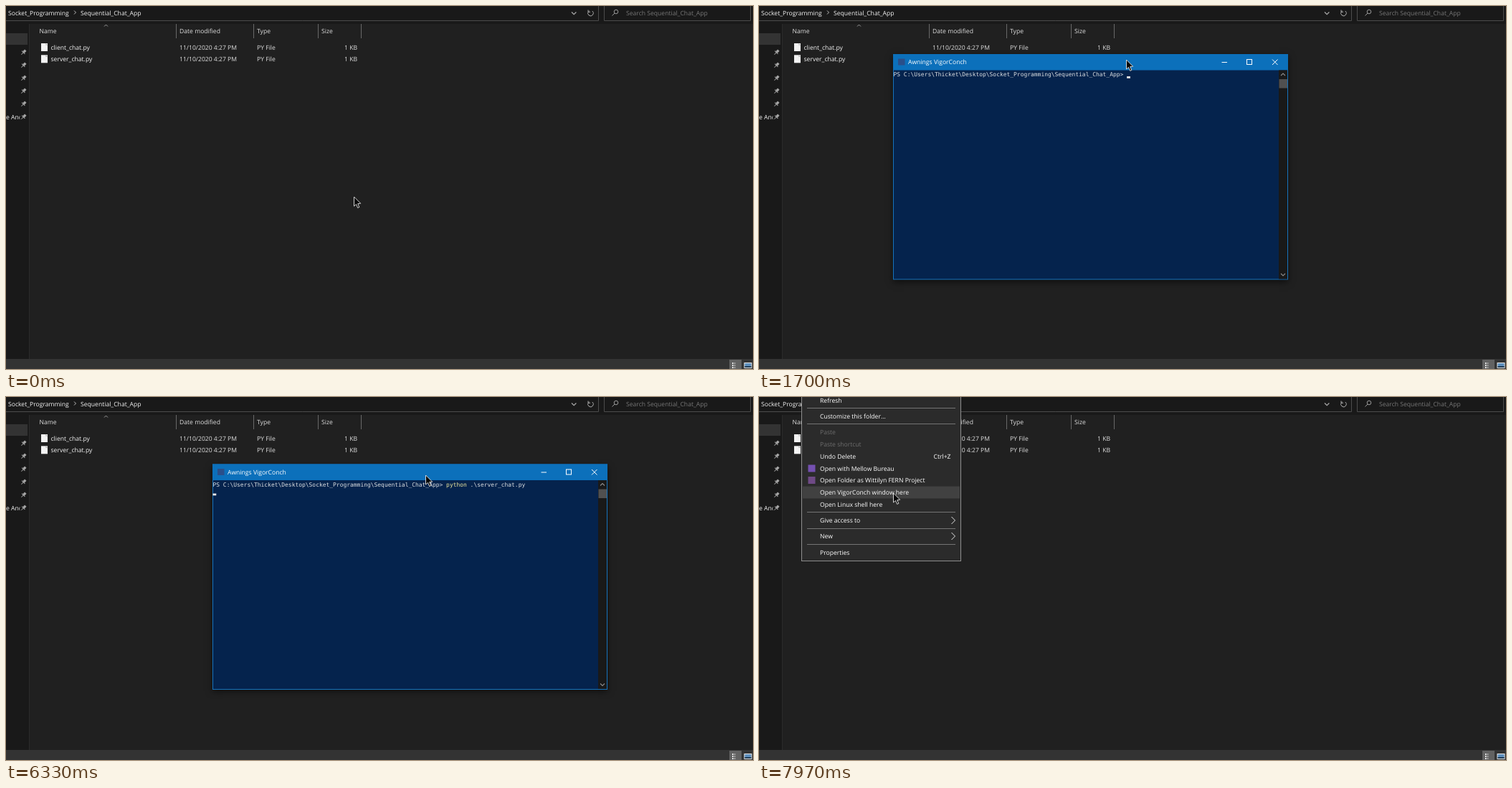
An HTML page with a canvas that plays this animation: 1042 px wide and 506 px high, repeating every 8000 ms.

```html
<!DOCTYPE html>
<html lang="en">
<head>
<meta charset="utf-8">
<title>Opening a shell and starting a chat server</title>
<style>
  html, body { margin: 0; width: 100%; height: 100%; overflow: hidden; background: #202020; }
  canvas { display: block; }
</style>
</head>
<body>
<canvas id="stage" width="1042" height="506"></canvas>
<script>
const ctx = document.getElementById('stage').getContext('2d');
const LOOP = 8000;
const UI = '8.6px "Open Sans", "Noto Sans", sans-serif';
const MONO = '7.96px "DejaVu Sans Mono", monospace';
const PROMPT = String.raw`PS C:\Users\Thicket\Desktop\Socket_Programming\Sequential_Chat_App> `;
const COMMAND = String.raw`python .\server_chat.py`;

// The shell opens, then drops behind the folder once that is clicked
const SHELL_OPENS = 1400, SHELL_HIDES = 7400;

// Key points: time, x, y
const MOUSE = [
  [300, 485, 266], [1050, 420, 172], [1250, 420, 172], [1680, 512, 75], [1740, 512, 75],
  [2150, 613, 101], [2400, 592, 126], [6170, 592, 126], [6310, 585, 109], [6400, 585, 109],
  [6900, 843, 120], [6970, 843, 120], [7300, 287, 231], [7400, 282, 229], [7530, 282, 229],
  [7930, 187, 134]
];
const WINDOW = [[1740, 187, 67], [2150, 288, 93.5], [6400, 288, 93.5], [6900, 546, 104.5]];

// Menu rows: label, centre measured from the menu's bottom edge, kind
const ROWS = [
  ['Sort by', 257, 'sub'], ['Group by', 240, 'sub'], ['Refresh', 223.5],
  ['Customize this folder...', 201.5], ['Paste', 179, 'off'], ['Paste shortcut', 162, 'off'],
  ['Undo Delete', 145.5, 'Ctrl+Z'], ['Open with Mellow Bureau', 128.5, '#7450b0'],
  ['Open Folder as Wittilyn FERN Project', 112, '#6f4a86'],
  ['Open VigorConch window here', 95], ['Open Linux shell here', 78.5],
  ['Give access to', 56, 'sub'], ['New', 34, 'sub'], ['Properties', 11.5]
];
const SEPARATORS = [213, 191, 68, 45, 23];

const clamp = v => Math.max(0, Math.min(1, v));
const ease = v => v * v * (3 - 2 * v);

function follow(path, t) {
  const i = path.findIndex(p => p[0] > t);
  if (i === 0) return path[0].slice(1);
  if (i < 0) return path[path.length - 1].slice(1);
  const [t0, x0, y0] = path[i - 1], [t1, x1, y1] = path[i];
  const k = ease((t - t0) / (t1 - t0));
  return [x0 + (x1 - x0) * k, y0 + (y1 - y0) * k];
}

function rect(x, y, w, h, color) {
  ctx.fillStyle = color;
  ctx.fillRect(x, y, w, h);
}

function text(str, x, y, color = '#f2f2f2', font = UI, align = 'left') {
  ctx.font = font;
  ctx.textAlign = align;
  ctx.textRendering = 'geometricPrecision';
  ctx.fillStyle = color;
  ctx.fillText(str, x, y);
}

function line(points, color, width = 1) {
  ctx.beginPath();
  for (let i = 0; i < points.length; i += 2) ctx.lineTo(points[i], points[i + 1]);
  ctx.strokeStyle = color;
  ctx.lineWidth = width;
  ctx.stroke();
}

function arc(x, y, r, from, to, color) {
  ctx.beginPath();
  ctx.arc(x, y, r, from, to);
  ctx.strokeStyle = color;
  ctx.lineWidth = 1;
  ctx.stroke();
}

function pin(x, y) {
  ctx.save();
  ctx.translate(x, y);
  ctx.rotate(Math.PI / 4);
  rect(-1.7, -4, 3.4, 4, '#a5a5a5');
  rect(-3, -0.3, 6, 1.2, '#a5a5a5');
  rect(-0.4, 0.5, 0.8, 4, '#a5a5a5');
  ctx.restore();
}

function drawFile(name, y) {
  rect(49, y - 6, 9, 11, '#f4f4f4');
  ctx.fillStyle = '#a8a8a8';
  ctx.beginPath();
  ctx.moveTo(55.5, y - 6);
  ctx.lineTo(58, y - 3.5);
  ctx.lineTo(55.5, y - 3.5);
  ctx.fill();
  text(name, 62.5, y + 3);
  text('11/10/2020 4:27 PM', 242, y + 3, '#dedede');
  text('PY File', 350, y + 3, '#dedede');
  text('1 KB', 490, y + 3, '#dedede', UI, 'right');
}

function drawExplorer() {
  rect(0, 0, 1042, 506, '#202020');
  rect(0, 0, 1042, 25, '#191919');
  rect(0, 25, 32, 467, '#191919');
  rect(32, 25, 1, 467, '#2b2b2b');
  rect(0, 38, 30, 16, '#333');
  rect(0, 492, 1042, 14, '#333');

  line([0, 20.5, 826.5, 20.5, 826.5, 0], '#4c4c4c');
  line([834.5, 0, 834.5, 20.5, 1038.5, 20.5, 1038.5, 0], '#4c4c4c');
  text('Socket_Programming', 3, 13);
  text('Sequential_Chat_App', 104, 13);
  line([95, 6.5, 97.5, 9, 95, 11.5], '#bbb');
  line([789, 8.5, 792.2, 11.7, 795.4, 8.5], '#aaa', 1.2);
  arc(815.5, 10, 3.8, -0.9, 4.2, '#aaa');
  line([812, 5.5, 812, 8.3, 815, 8.3], '#aaa');
  arc(851, 8, 2.8, 0, 7, '#999');
  line([849, 10, 845.5, 13.5], '#999');
  text('Search Sequential_Chat_App', 865, 13, '#777');

  [237.5, 345.5, 435.5, 495.5].forEach(x => line([x, 25, x, 45], '#686868'));
  [['Name', 46.5], ['Date modified', 242], ['Type', 350], ['Size', 440]]
    .forEach(([label, x]) => text(label, x, 38, '#dedede'));
  line([137, 28.5, 139.5, 26, 142, 28.5], '#999');
  drawFile('client_chat.py', 58);
  drawFile('server_chat.py', 74.3);

  for (let i = 0; i < 6; i++) pin(24.5, 64.5 + i * 18);
  ctx.save();
  ctx.beginPath();
  ctx.rect(0, 145, 19.5, 20);
  ctx.clip();
  text('e And', 0, 157.5);
  ctx.restore();

  rect(1009, 493, 17, 13, '#626262');
  for (let i = 0; i < 3; i++) {
    rect(1013, 497 + i * 3, 1.5, 2, '#fff');
    rect(1015.5, 497.5 + i * 3, 2, 1, '#ddd');
  }
  rect(1029.5, 497, 11, 8, '#e8e8e8');
  rect(1030.5, 498, 9, 6, '#5d8fbd');
  rect(1030.5, 502, 9, 2, '#243d55');
}

function drawMenu(right, bottom, mouseY, alpha) {
  const left = right - 222;
  ctx.save();
  ctx.globalAlpha = alpha;
  rect(left, -2, 222, bottom + 1.5, '#2b2b2b');
  ctx.strokeStyle = '#8f8f8f';
  ctx.lineWidth = 1;
  ctx.strokeRect(left, -2.5, 222, bottom + 3);
  SEPARATORS.forEach(up => rect(left + 7.5, bottom - up, 207, 1, '#747474'));
  for (const [label, up, kind = ''] of ROWS) {
    const y = bottom - up;
    if (Math.abs(y - mouseY) < 8.4) rect(left + 1.5, y - 8.4, 219, 16.8, '#414141');
    text(label, left + 25.5, y + 3, kind === 'off' ? '#6d6d6d' : '#fff');
    if (kind === 'sub') line([left + 209, y - 5, left + 214, y, left + 209, y + 5], '#e4e4e4');
    if (kind === 'Ctrl+Z') text(kind, left + 208, y + 3, '#fff', UI, 'right');
    if (kind[0] === '#') rect(left + 9, y - 5, 10, 10, kind);
  }
  ctx.restore();
}

function typedCommand(t) {
  if (t < 2570) return '';
  if (t < 3900) return COMMAND.slice(0, Math.min(7, 1 + Math.floor((t - 2570) / 83)));
  if (t < 4770) return COMMAND.slice(0, 8 + Math.min(5, Math.floor((t - 3900) / 140)));
  return COMMAND;
}

function caretVisible(t) {
  return !(t >= 3370 && t < 3630 || t >= 5770 && t < 6170 || t >= 6800);
}

function drawShell(t) {
  const [x, y] = follow(WINDOW, t);
  const opening = clamp((t - SHELL_OPENS) / 130);
  const scale = 0.92 + 0.08 * ease(opening);
  ctx.save();
  ctx.globalAlpha = opening;
  ctx.translate(x + 275.5, y + 157.5);
  ctx.scale(scale, scale);
  ctx.translate(-275.5, -157.5);

  ctx.shadowColor = 'rgba(0, 0, 0, .55)';
  ctx.shadowBlur = 9;
  ctx.shadowOffsetY = 3;
  rect(0, 0, 551, 314.5, '#1673bd');
  ctx.shadowColor = 'transparent';
  rect(0, 0, 551, 22.5, '#0c70bb');
  rect(1, 22.5, 549, 291, '#05234d');

  rect(7, 6.5, 9.5, 9, '#2a4f8a');
  text('Awnings VigorConch', 21, 14.3, '#fff');
  line([458.5, 11.5, 466, 11.5], '#fff');
  ctx.strokeRect(493.5, 7.5, 7, 7);
  line([529, 7.5, 536.5, 15], '#fff');
  line([536.5, 7.5, 529, 15], '#fff');

  rect(538, 22.5, 12, 291, '#191919');
  rect(538.5, 35, 11.5, 12.5, '#505050');
  line([541, 30, 544, 27, 547, 30], '#8c8c8c', 1.1);
  line([541, 306, 544, 309, 547, 306], '#8c8c8c', 1.1);

  if (t >= 1580) {
    const typed = typedCommand(t);
    ctx.font = MONO;
    const cell = ctx.measureText('0').width;
    const start = 0.5 + PROMPT.length * cell;
    text(PROMPT, 0.5, 31, '#dcdfe2', MONO);
    text(typed.slice(0, 6), start, 31, '#ede79f', MONO);
    text(typed.slice(6), start + 6 * cell, 31, '#dcdfe2', MONO);
    const entered = t >= 5400;
    const caretX = entered ? 0.5 : start + typed.length * cell;
    if (caretVisible(t)) {
      rect(caretX, entered ? 41 : 31, cell, 2.8, typed && !entered ? '#ede79f' : '#e6e6e6');
    }
  }
  ctx.restore();
}

function drawMouse(x, y) {
  ctx.save();
  ctx.translate(x + 0.5, y);
  ctx.beginPath();
  [[0, 0], [0, 13], [3, 10.4], [5.2, 15.4], [7.3, 14.4], [5.2, 9.6], [9.2, 9.2]]
    .forEach(([px, py]) => ctx.lineTo(px, py));
  ctx.closePath();
  ctx.fillStyle = '#050505';
  ctx.fill();
  ctx.strokeStyle = '#e8e8e8';
  ctx.lineWidth = 0.9;
  ctx.stroke();
  ctx.restore();
}

function draw(now) {
  const t = now % LOOP;
  const [mouseX, mouseY] = follow(MOUSE, t);
  drawExplorer();
  if (t >= SHELL_OPENS && t < SHELL_HIDES) drawShell(t);
  if (t >= 130 && t < 1270) drawMenu(484.5, 266, mouseY, clamp((t - 130) / 100));
  if (t >= 7430) drawMenu(281.5, 228, mouseY, clamp((t - 7430) / 100));
  drawMouse(mouseX, mouseY);
}

const begin = performance.now();
function tick() {
  draw(performance.now() - begin);
  requestAnimationFrame(tick);
}
tick();
</script>
</body>
</html>
```
